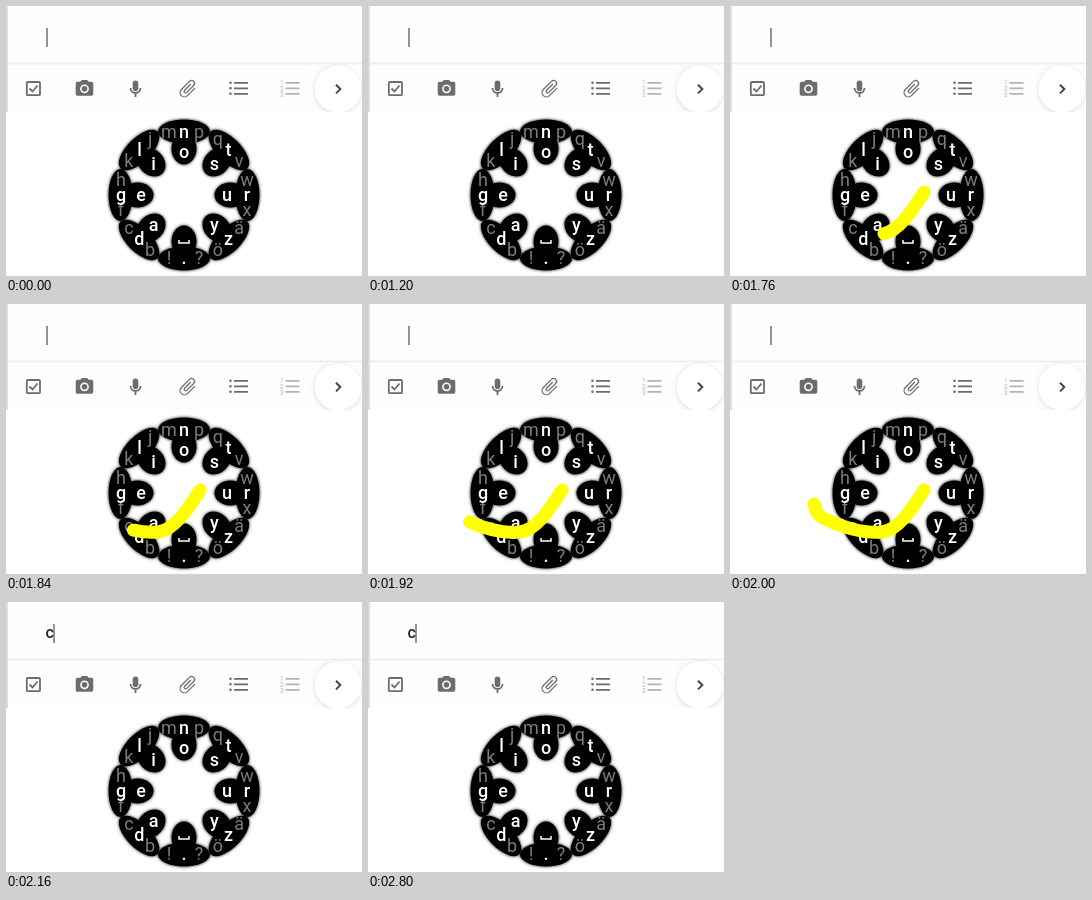
An HTML page for the animation above (3040 ms loop, 356 by 270 pixels).

```html
<!DOCTYPE html>
<html lang="en">
<meta charset="utf-8">
<title>Circular keyboard</title>
<style>
html, body { margin: 0; width: 100%; height: 100%; overflow: hidden; background: #fff }
svg { display: block; width: 356px; height: 270px; font: 18px Roboto, sans-serif }
#halo { filter: blur(.4px) drop-shadow(0 0 1px #666) drop-shadow(0 0 1.5px #888) }
#dial text { text-anchor: middle }
.line { fill: none; stroke: #6c6c6c; stroke-width: 1.8 }
.fill { fill: #6c6c6c }
.dots { stroke-width: 2.6; stroke-linecap: round }
</style>
<svg viewBox="0 0 356 270">
  <defs>
    <linearGradient id="fade"><stop stop-color="#fff" stop-opacity="0"/><stop offset="1" stop-color="#f4f4f4"/></linearGradient>
    <path id="rows" d="M228 76.800H242M228 82.300H242M228 87.800H242"/>
  </defs>

  <path d="M0 106V0H356V106Z" fill="#fefefe"/>
  <path d="M1 0V106" stroke="#ddd" stroke-width="2"/>
  <path d="M2 57.500H356" stroke="#efefef" stroke-width="2"/>
  <text id="typed" x="39.500" y="36" font-size="16" font-weight="500" fill="#222"></text>
  <path id="caret" d="M41 22V41" stroke="#777" stroke-width="1.600"/>

  <g class="line">
    <rect x="20.800" y="76" width="13.200" height="13.200" rx="1"/>
    <path d="M23.500 82.500l3 3 5-6"/>
  </g>
  <path class="fill" transform="translate(78.500 82.800) scale(.88) translate(-12 -12)" fill-rule="evenodd"
    d="M9 2L7.200 4H4q-2 0-2 2v12q0 2 2 2h16q2 0 2-2V6q0-2-2-2h-3.200L15 2zM12 7a5 5 0 100 10 5 5 0 000-10zM12 8.800a3.200 3.200 0 110 6.400 3.200 3.200 0 010-6.400z"/>
  <rect class="fill" x="126.700" y="74.500" width="5.600" height="10.500" rx="2.800"/>
  <path class="line" d="M124.500 82a5 5 0 0010 0M129.500 87.500V91"/>
  <path class="line" style="stroke-width:1.400" transform="translate(182 83) rotate(45) scale(.92) translate(-12.500 -12)"
    d="M17.200 6V17.500a4.700 4.700 0 01-9.400 0V5a3.200 3.200 0 016.400 0V15.500a1.700 1.700 0 01-3.400 0V6"/>
  <use href="#rows" class="line"/>
  <path class="line dots" d="M224.500 76.800h.01M224.500 82.300h.01M224.500 87.800h.01"/>
  <g opacity=".5">
    <use href="#rows" class="line" x="51.500"/>
    <g class="fill" font-size="6.500"><text x="274" y="79">1</text><text x="274" y="84.800">2</text><text x="274" y="90.600">3</text></g>
  </g>
  <rect x="296" y="60" width="30" height="45" fill="url(#fade)"/>
  <circle cx="332" cy="83" r="23.500" fill="#fff" style="filter:drop-shadow(0 1px 2px #ddd)"/>
  <path d="M330 78.800l4.300 4.300-4.300 4.300" fill="none" stroke="#444" stroke-width="2"/>

  <rect y="106" width="356" height="164" fill="#fff"/>
  <g id="dial"><g id="halo"></g></g>
  <path id="stroke" d="M194 186C183 203 169 226 152 228S110 223 91 213Q84 208 84 197"
    fill="none" stroke="#ff0" stroke-width="13" stroke-linecap="round"/>
</svg>
<script>
const $ = id => document.getElementById(id);
const CX = 178, CY = 189, LOOP = 3040, STEP = 80, PRESS = 1600, RELEASE = 2080;

// Clockwise from the top: inner letter, outer letter, then the two beside it
const petals = ['onmp', 'stqv', 'urwx', 'yzäö', ' .?!', 'adbc', 'egfh', 'ilkj'];

function letter(char, angle, radius, side = 0) {
  const x = CX + radius * Math.sin(angle) + side * Math.cos(angle);
  const y = CY - radius * Math.cos(angle) + side * Math.sin(angle);
  if (char === ' ') return `<path d="M${x - 5} ${y + 2}v3h10v-3" fill="none" stroke="#fff" stroke-width="1.5"/>`;
  const look = side ? 'fill="#7c7c7c"' : 'fill="#fff" font-weight="500"';
  return `<text x="${x}" y="${y + 5.5}" ${look}>${char}</text>`;
}

let shapes = '', letters = '';
petals.forEach(([inner, outer, before, after], i) => {
  const angle = i * Math.PI / 4;
  shapes += `<g transform="translate(${CX} ${CY}) rotate(${i * 45})">
    <ellipse cy="-63.5" rx="26" ry="12"/><ellipse cy="-46.5" rx="12.5" ry="16"/></g>`;
  letters += letter(before, angle, 63, -15) + letter(after, angle, 63, 15)
    + letter(outer, angle, 63) + letter(inner, angle, 43);
});
$('halo').innerHTML = shapes;
$('dial').insertAdjacentHTML('beforeend', letters);

function draw() {
  const t = performance.now() % LOOP;
  const typed = t >= RELEASE;
  const length = 5 + 27 * Math.floor((t - PRESS) / STEP);
  $('stroke').style.display = t >= PRESS && !typed ? '' : 'none';
  $('stroke').setAttribute('stroke-dasharray', `${Math.max(length, 0)} 999`);
  $('typed').textContent = typed ? 'c' : '';
  $('caret').setAttribute('transform', `translate(${typed ? 7 : 0})`);
  requestAnimationFrame(draw);
}
draw();
</script>
</html>
```
